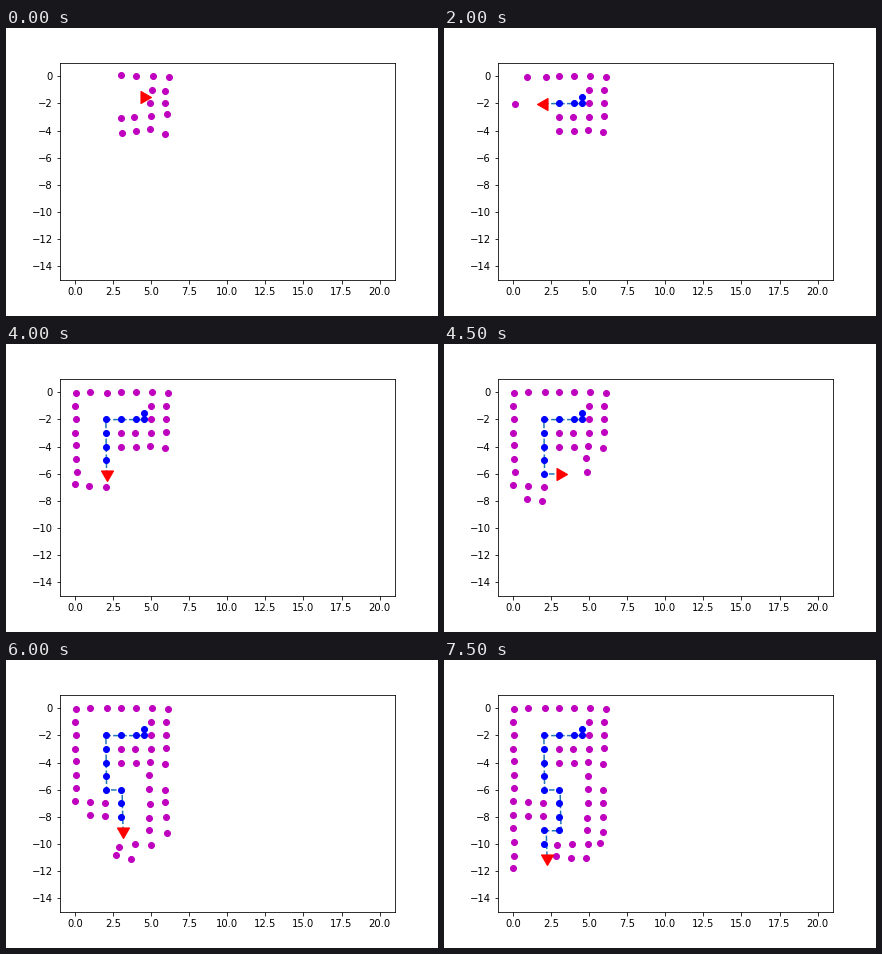
A matplotlib script for the animation above (8000 ms loop, 432 px wide and 288 px high).

```python
import random

import matplotlib.pyplot as plt
from matplotlib.animation import FuncAnimation

STEP_MS = 500
ROUTE = "RDLLLDDDDRDDDLDD"
HEADING = {"R": -90, "D": 180, "L": 90}
MOVE = {"R": (1, 0), "D": (0, -1), "L": (-1, 0)}

rng = random.Random(4)
landmarks = []


def wall(step, cols, rows):
    """Add wall cells that the robot first senses at this step."""
    for row in rows:
        for col in cols:
            noise = rng.gauss(0, 1), rng.gauss(0, 1)
            landmarks.append((step, col, row, noise))


def build_walls():
    # Starting room
    wall(0, range(3, 7), (0, 3, 4))
    wall(0, (5, 6), (1, 2))
    # Upper left corner and left wall
    wall(3, [2], [0])
    wall(4, [1], [0])
    wall(4, [0], [2])
    wall(5, [0], (0, 1, 3, 4))
    for row in (5, 6, 7):
        wall(row + 1, [0], [row])
    # Ledge below the first corridor
    wall(7, (1, 2), [7])
    wall(9, (1, 2), [8])
    # Right wall of the second corridor
    wall(9, [5], (5, 6))
    wall(10, [5], [7])
    wall(10, [6], [6])
    wall(11, [5], (8, 9))
    wall(12, [6], (7, 8, 9))
    # Floor and lower left wall
    wall(12, (3, 4, 5), [10])
    wall(12, (3, 4), [11])
    wall(13, [0], [9])
    wall(13, [5], [11])
    wall(13, [6], [10])
    wall(14, [0], (8, 10, 11))
    wall(15, [0], [12])


def true_path():
    """Half-length moves out of the start cell, then whole cells."""
    x, y = 4.5, -1.5
    path = [(x, y)]
    for i, turn in enumerate(ROUTE[1:]):
        size = 0.5 if i < 2 else 1
        dx, dy = MOVE[turn]
        x, y = x + size * dx, y + size * dy
        path.append((x, y))
    return path


def estimate(step):
    """Odometry drift grows with the square of the step."""
    x, y = PATH[step]
    return x + 0.001 * step ** 2, y - 0.02


def locate(step, seen, col, row, noise):
    """Map drift plus noise that settles after the first sighting."""
    spread = 0.03 + 0.08 * 0.5 ** (step - seen)
    x = col + 0.02 - 0.004 * col * row + spread * noise[0]
    y = -row + (0.014 - 0.003 * col) * row + spread * noise[1]
    return x, y


def xy(points):
    return [p[0] for p in points], [p[1] for p in points]


build_walls()
PATH = true_path()
POSES = [estimate(s) for s in range(len(PATH))]

plt.rcParams.update({"font.family": "DejaVu Sans", "font.size": 10})
fig, ax = plt.subplots(figsize=(6, 4), dpi=72)
fig.subplots_adjust(left=0.125, right=0.9, bottom=0.125, top=0.88)
ax.set_xlim(-1, 21)
ax.set_ylim(-15, 1)

track, = ax.plot([], [], "--", color="C0", lw=1.5, zorder=2)
visited, = ax.plot([], [], "bo", ms=6, zorder=3)
marks, = ax.plot([], [], "mo", ms=6, zorder=3)
robot, = ax.plot([], [], "r", ls="none", ms=14.2, zorder=4)


def draw(step):
    track.set_data(*xy(POSES[:step + 1]))
    visited.set_data(*xy(PATH[:step]))
    marks.set_data(*xy([locate(step, *m) for m in landmarks if m[0] <= step]))
    robot.set_data(*xy([POSES[step]]))
    robot.set_marker((3, 0, HEADING[ROUTE[step]]))
    return track, visited, marks, robot


anim = FuncAnimation(fig, draw, frames=len(PATH), interval=STEP_MS,
                     init_func=lambda: draw(0), repeat=True, repeat_delay=0)
plt.show()
```
